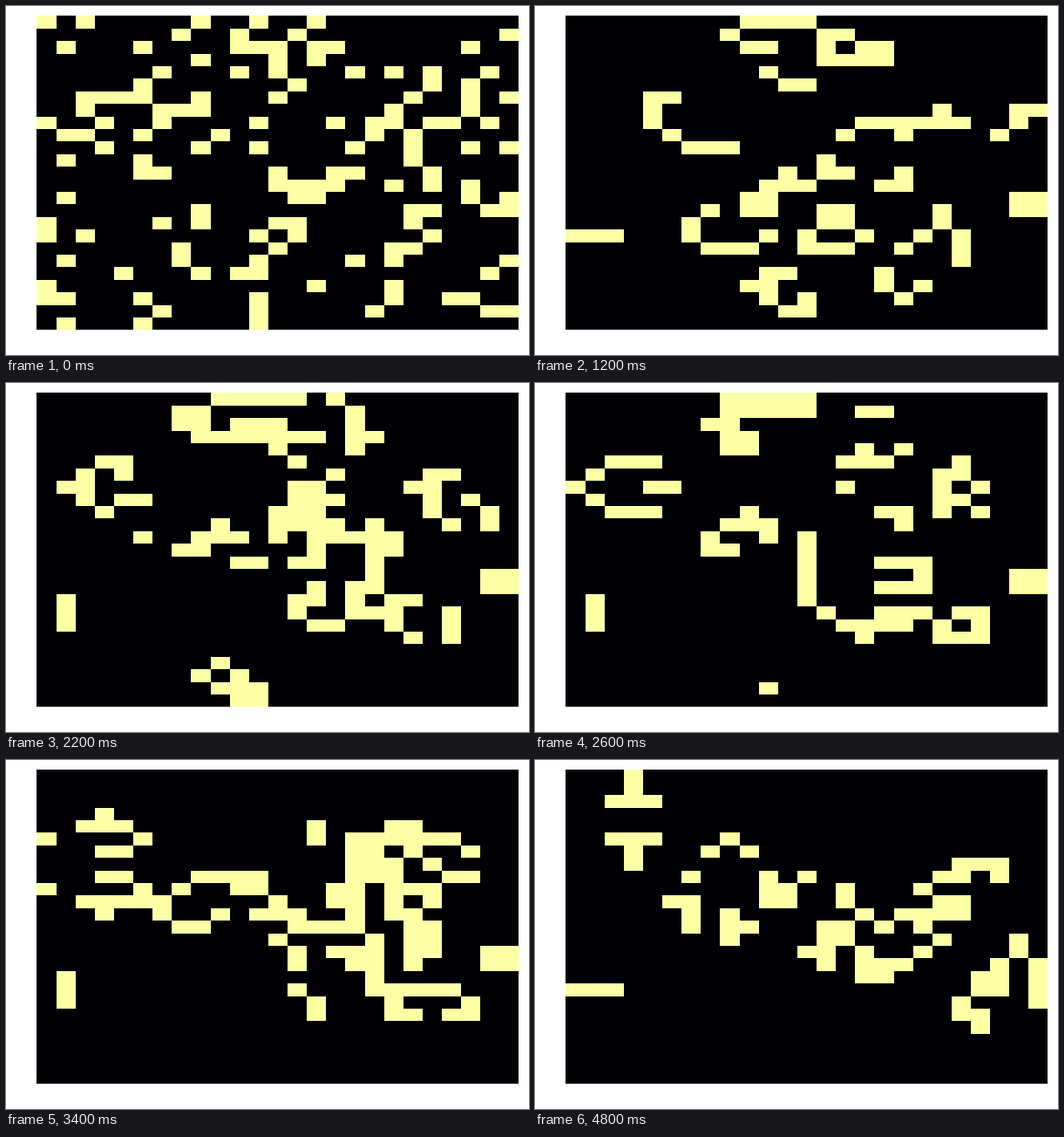
These frames come from a looping animation (600x400 px, 5000 ms). A matplotlib script:

```python
import numpy as np
import matplotlib.pyplot as plt
from matplotlib.animation import FuncAnimation
from matplotlib.colors import ListedColormap

WIDTH, HEIGHT, DPI = 600, 400, 100
SIZE = 25
GENERATIONS, STEP_MS = 25, 200

# Live columns of the starting generation, row by row.
START = [
    [0, 2, 8, 11, 14],
    [7, 10, 13, 24],
    [1, 5, 10, 11, 12, 14, 15, 22],
    [8, 12, 14],
    [6, 10, 12, 16, 18, 20, 23],
    [5, 13, 20, 22],
    [2, 3, 4, 5, 8, 12, 19, 22, 24],
    [2, 6, 7, 8, 18, 22],
    [0, 3, 6, 11, 15, 17, 18, 20, 21, 23],
    [1, 2, 5, 9, 17, 19],
    [3, 8, 11, 16, 19, 22, 24],
    [1, 5, 19],
    [5, 6, 12, 15, 16, 20],
    [12, 13, 14, 15, 18, 20, 22],
    [1, 13, 14, 22, 24],
    [8, 19, 20, 23, 24],
    [0, 6, 8, 12, 13, 19],
    [0, 2, 11, 13, 20],
    [7, 12, 18, 19],
    [1, 7, 11, 16, 18, 24],
    [4, 8, 10, 11, 23],
    [0, 14, 18],
    [0, 1, 5, 11, 18, 21, 22],
    [6, 11, 17, 23, 24],
    [1, 5, 11],
]


def first_generation():
    grid = np.zeros((SIZE, SIZE), dtype=int)
    for row, columns in zip(grid, START):
        row[columns] = 1
    return grid


def next_generation(grid):
    """One step of Conway's Life; everything outside the board is dead."""
    padded = np.pad(grid, 1)
    block = sum(padded[r:r + SIZE, c:c + SIZE]
                for r in range(3) for c in range(3))
    return ((block == 3) | ((grid == 1) & (block == 4))).astype(int)


history = [first_generation()]
while len(history) < GENERATIONS:
    history.append(next_generation(history[-1]))

fig = plt.figure(figsize=(WIDTH / DPI, HEIGHT / DPI), dpi=DPI, facecolor="white")
ax = fig.add_axes([0, 0, 1, 1])
ax.set(xlim=(0, WIDTH), ylim=(HEIGHT, 0))
ax.axis("off")

# Cell borders rounded to whole pixels keep the edges crisp.
steps = np.arange(SIZE + 1)
x_edges = np.round(35.47 + 22.12 * steps)
y_edges = np.round(11.4 + 14.4 * steps)
board = ax.pcolormesh(x_edges, y_edges, history[0], vmin=0, vmax=1,
                      cmap=ListedColormap(["#000004", "#fcffa4"]),
                      antialiased=False, linewidth=0)


def update(generation):
    board.set_array(history[generation])
    return [board]


anim = FuncAnimation(fig, update, frames=GENERATIONS, interval=STEP_MS,
                     repeat=True, repeat_delay=0)
plt.show()
```
